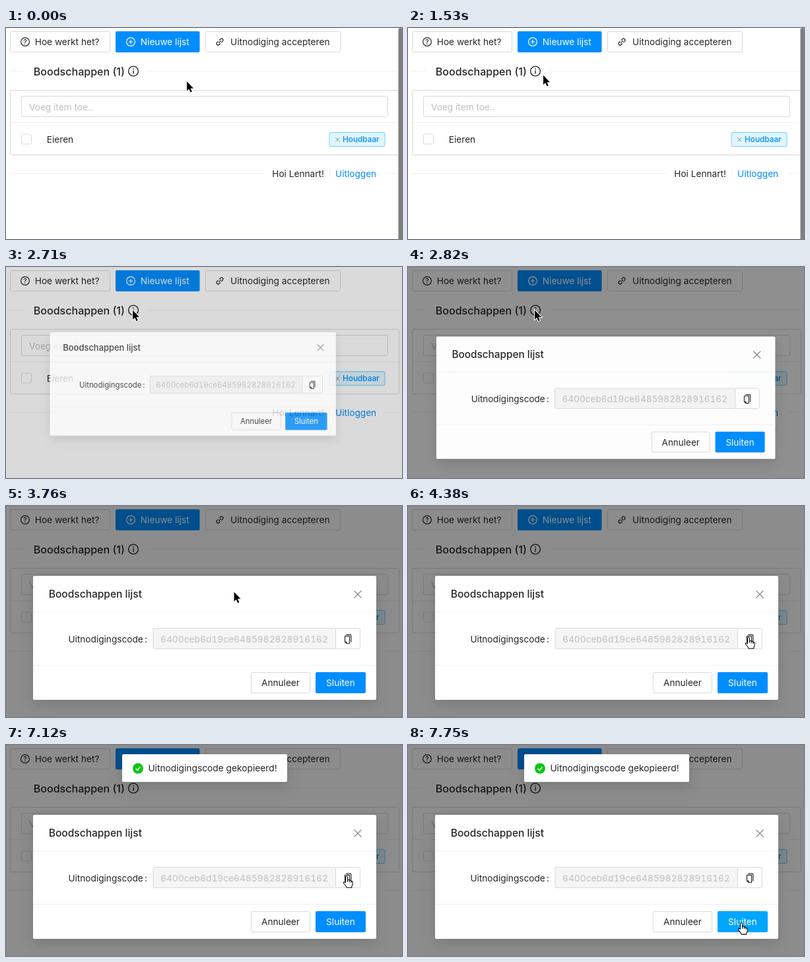
An HTML page for the animation above (8000 ms loop, 600 by 320 pixels).

```html
<!DOCTYPE html>
<html lang="nl">
<head>
<meta charset="utf-8">
<title>Boodschappen</title>
<style>
html, body { margin: 0; height: 100%; overflow: hidden; background: #fff; }
svg { display: block; }
text { font: 13.65px Inter, Roboto, sans-serif; fill: #262626; white-space: pre; }
.title { font-weight: 500; }
.box { fill: #fff; stroke: #d9d9d9; }
.split { stroke: #f0f0f0; }
.blue { fill: #008dff; }
.white { fill: #fff; }
.grey { fill: #bfbfbf; }
.icon { fill: none; stroke: #262626; stroke-width: 1.2; }
.card { fill: #fff; filter: drop-shadow(0 6px 8px rgba(0, 0, 0, .08)) drop-shadow(0 9px 14px rgba(0, 0, 0, .06)); }
</style>
</head>
<body>
<svg width="600" height="320" viewBox="0 0 600 320">
  <g id="page">
    <rect class="box" x="6.5" y="5.5" width="151" height="31" rx="2"/>
    <circle class="icon" cx="29" cy="21" r="6.4"/>
    <text x="29" y="24.6" text-anchor="middle" style="font-size:10px;font-weight:500">?</text>
    <text x="43.8" y="26">Hoe werkt het?</text>

    <rect class="blue" x="166" y="5" width="127.5" height="32" rx="2"/>
    <g class="icon" style="stroke:#fff">
      <circle cx="189" cy="21" r="6.4"/>
      <path d="M185.7 21h6.6M189 17.7v6.6"/>
    </g>
    <text class="white" x="203.8" y="26">Nieuwe lijst</text>

    <rect class="box" x="302.5" y="5.5" width="204" height="31" rx="2"/>
    <path class="icon" transform="translate(324 21) rotate(-45)"
      d="M-1-2.3h-2.7a2.3 2.3 0 0 0 0 4.6H-1M1-2.3h2.7a2.3 2.3 0 0 1 0 4.6H1M-2.6 0h5.2"/>
    <text x="340" y="26">Uitnodiging accepteren</text>

    <path class="split" d="M6 65.5h21M215 65.5h381M6 220.5h385M575 220.5h21M490.5 213v15"/>
    <text class="title" x="41.8" y="71.5" style="font-size:16.05px">Boodschappen (1)</text>
    <g class="icon" style="stroke-width:1.4">
      <circle cx="193" cy="65.5" r="7.4"/>
      <path d="M193 64.3v5.2M193 61.2v1.7"/>
    </g>

    <rect class="box" x="6.5" y="94.5" width="589" height="98" rx="2"/>
    <path class="split" d="M7 143.5h588"/>
    <rect class="box" x="23.5" y="103.5" width="555" height="31" rx="2"/>
    <text class="grey" x="35" y="124.5">Voeg item toe..</text>
    <rect class="box" x="23.5" y="161" width="15" height="15" rx="2"/>
    <text x="61.8" y="173.5">Eieren</text>
    <rect x="490" y="158.5" width="84" height="21" rx="2" fill="#e0f6ff" stroke="#70cfff"/>
    <path d="M499.3 166.3l6 6m0-6l-6 6" stroke="#7d8a92"/>
    <text class="blue title" x="510" y="173.2" style="font-size:11.8px">Houdbaar</text>

    <text x="403.3" y="225.5">Hoi Lennart!</text>
    <text class="blue" x="499" y="225.5">Uitloggen</text>
  </g>
  <rect id="bar" x="594.5" y="0" width="6" height="340" rx="3" fill="#7f7f7f"/>
  <rect id="mask" width="600" height="320"/>

  <g id="modal">
    <rect class="card" x="41" y="106" width="520" height="188" rx="2"/>
    <path class="split" d="M41 160.5h520M41 241.5h520"/>
    <text class="title" x="64.8" y="139" style="font-size:15.53px">Boodschappen lijst</text>
    <path d="M527.5 128.5l11 11m0-11l-11 11" stroke="#8a8a8a" stroke-width="1.3"/>
    <text x="94.4" y="206.5">Uitnodigingscode</text>
    <text x="210" y="206.5">:</text>
    <rect class="box" x="223" y="185.5" width="277" height="31" rx="2" style="fill:#f5f5f5"/>
    <text class="grey" x="234" y="206.5" style="font-size:13.77px;font-variant-numeric:tabular-nums">6400ceb6d19ce6485982828916162</text>
    <rect class="box" x="499.5" y="185.5" width="37" height="31" rx="2"/>
    <path class="icon" d="M515.3 195.2h6.4q1.1 0 1.1 1.1v10.2M513.5 197.4h7v11.1h-4.5l-2.5-2.5zM513.5 206h2.5v2.5"/>
    <rect class="box" x="371.5" y="252.5" width="89" height="31" rx="2"/>
    <text x="416" y="273.3" text-anchor="middle">Annuleer</text>
    <rect id="close" x="469" y="252" width="76" height="32" rx="2"/>
    <text class="white" x="507" y="273.3" text-anchor="middle">Sluiten</text>
  </g>

  <g id="toast">
    <rect class="card" x="176" y="14" width="250" height="42" rx="2"/>
    <circle cx="200" cy="35.5" r="8" fill="#0cc610"/>
    <path d="M196.6 35.7l2.5 2.7 4.3-5.4" fill="none" stroke="#fff" stroke-width="1.6"/>
    <text x="215.4" y="40.3" style="font-size:13.75px">Uitnodigingscode gekopieerd!</text>
  </g>

  <path id="arrow" d="M0 0v14.2l3.2-3 2.3 5.3 2.3-1-2.3-5.1h4.6z" stroke="#fff" stroke-width="2" paint-order="stroke"/>
  <path id="hand" fill="#fff" stroke="#000" stroke-width="1.05" stroke-linejoin="round"
    d="M-1.5 10V1.8a1.5 1.5 0 0 1 3 0V8.5V6.8a1.4 1.4 0 0 1 2.8.2v2V7.6a1.3 1.3 0 0 1 2.6.3v1.8V8.6a1.2 1.2 0 0 1 2.3.5V12q0 2-1.4 3.6v2H.2q-.6-2.2-2.2-3.8l-2.6-3q-.4-2.2 1.6-1.7z"/>
</svg>
<script>
const LOOP = 8000;
const el = id => document.getElementById(id);
const [bar, mask, modal, closeBtn, toast, arrow, hand] =
  ['bar', 'mask', 'modal', 'close', 'toast', 'arrow', 'hand'].map(el);

const part = (t, from, to) => Math.min(1, Math.max(0, (t - from) / (to - from)));
const mix = (a, b, p) => a + (b - a) * p;
const out = k => p => 1 - (1 - p) ** k;
const smooth = p => p * p * (3 - 2 * p);
const show = (node, on) => node.style.display = on ? '' : 'none';

// cubic-bezier(.08, .82, .17, 1)
function circOut(x) {
  const curve = (u, a, b) => 3 * (1 - u) ** 2 * u * a + 3 * (1 - u) * u * u * b + u ** 3;
  let lo = 0, hi = 1;
  for (let i = 0; i < 24; i++) {
    const mid = (lo + hi) / 2;
    if (curve(mid, .08, .17) < x) lo = mid; else hi = mid;
  }
  return curve(hi, .82, 1);
}

// start, end, x, y, easing
const moves = [
  [1020, 1820, 191, 70, out(1.75)],
  [1880, 2000, 189.5, 70, smooth],
  [2000, 2180, 192, 65.5, smooth],
  [3480, 4270, 510, 200, out(1.5)],
  [4270, 4330, 516, 194, smooth],
  [4330, 4380, 516, 198.7, smooth],
  [7120, 7750, 505, 269.5, smooth]
];

function pointer(t) {
  let x = 274, y = 81;
  for (const [from, to, toX, toY, ease] of moves) {
    const p = ease(part(t, from, to));
    x = mix(x, toX, p);
    y = mix(y, toY, p);
  }
  return [x, y];
}

function draw(t) {
  show(bar, t < 2590);
  mask.setAttribute('opacity', .45 * part(t, 2656, 2825));

  const zoom = circOut(part(t, 2661, 2905));
  show(modal, t > 2661);
  modal.setAttribute('opacity', zoom);
  modal.setAttribute('transform', `translate(194 64) scale(${mix(.2, 1, zoom)}) translate(-194 -64)`);

  const drop = circOut(part(t, 5628.5, 5828.5));
  show(toast, t >= 5635);
  toast.setAttribute('opacity', drop);
  toast.setAttribute('transform', `translate(0 ${mix(-58, 0, drop)})`);

  const [x, y] = pointer(t);
  const pointing = t >= 4325 && (y < 217 || y > 252);
  show(arrow, !pointing);
  show(hand, pointing);
  (pointing ? hand : arrow).setAttribute('transform', `translate(${x} ${y})`);
  closeBtn.setAttribute('fill', `rgb(0 ${mix(141, 165, part(t, 7500, 7740))} 255)`);
}

const start = performance.now();
function tick() {
  draw((performance.now() - start) % LOOP);
  requestAnimationFrame(tick);
}
tick();
</script>
</body>
</html>
```
